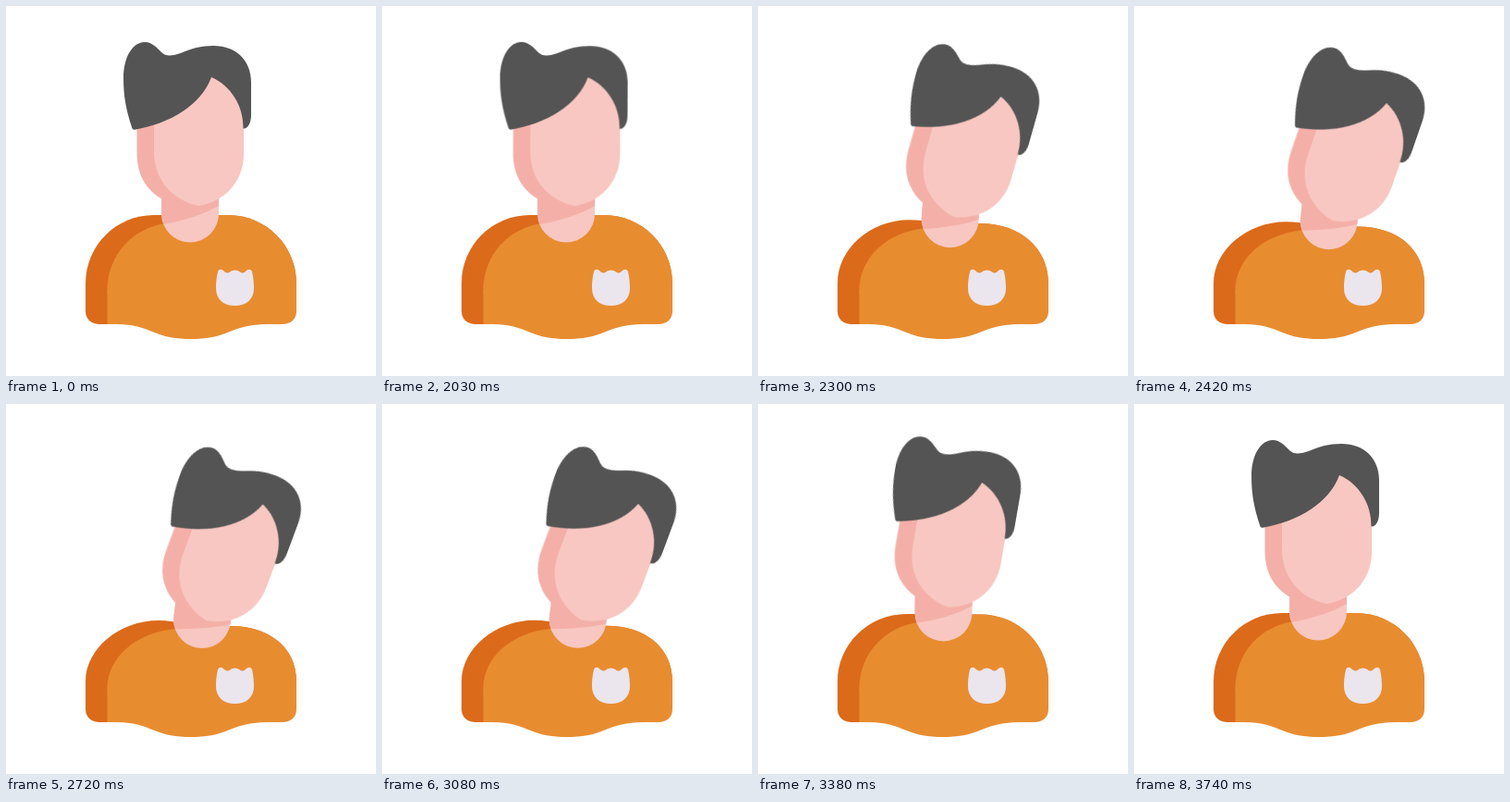
An HTML page that plays this animation: 400x400 px, repeating every 3.77 s.

```html
<!DOCTYPE html>
<html lang="en">
<head>
<meta charset="utf-8">
<title>Tilting head</title>
<style>
  html, body { margin: 0; width: 100%; height: 100%; overflow: hidden; background: #fff; }
  svg { display: block; width: 100vw; height: 100vh; }

  .skin { fill: #f8c7c1; }
  .shade { fill: #f4b0a8; }
  .shirt { fill: #e88c30; }
  .fold { fill: #dc6a1b; }
  .hair { fill: #545454; }
  .badge { fill: #ebe5ed; }

  .shift, .tilt, .morph { animation: 3770ms linear infinite; }
  .shift { animation-name: shift; }
  .tilt { animation-name: tilt; transform-origin: 190px 190px; }
  .morph { animation-name: sink; d: var(--rest); }

  .back {
    --rest: path("M86 302V300C86 259 119 226 160 226C170 226 180 226 195 226L240 226C281 226 314 259 314 300V302Z");
    --lean: path("M86 302V300C86 265 122 234 165 234C175 234 185 236 195 238L243 240C283 240 314 262 314 300V302Z");
  }
  .front {
    --rest: path("M109.5 312V308C109.5 268 138 240 172 235L195 226L240 226C281 226 314 259 314 300V312Z");
    --lean: path("M109.5 312V308C109.5 274 140 247 184 243L195 238L243 240C283 240 314 262 314 300V312Z");
  }
  .neck {
    --rest: path("M168 190L230 190L230 224.5A31 31 0 0 1 168 224.5Z");
    --lean: path("M185 200L246 200L243 233A31 31 0 0 1 181 233Z");
  }
  .shadow {
    --rest: path("M168 190L230 190L230 216L230 216Q205 230 170.2 236L168 224.5Z");
    --lean: path("M185 200L246 200L243 233L242.6 238Q222 243 182.8 243.5L181 233Z");
  }

  /* The head leans out, rests, then its position returns ahead of its rotation. */
  @keyframes shift {
    0%, 93.37%, 100% { transform: translate(0, 0); }
    53.05% { transform: translate(0, 0); animation-timing-function: cubic-bezier(.35, 0, .48, 1); }
    68.97% { transform: translate(18.1px, 13.1px); }
    80.37% { transform: translate(18.1px, 13.1px); animation-timing-function: cubic-bezier(.33, 0, .33, 1); }
  }
  @keyframes tilt {
    0%, 99.4%, 100% { transform: rotate(0deg); }
    53.05% { transform: rotate(0deg); animation-timing-function: cubic-bezier(.28, 0, .27, 1); }
    68.97% { transform: rotate(20.5deg); }
    82.1% { transform: rotate(20.5deg); animation-timing-function: cubic-bezier(.47, 0, .34, 1); }
  }
  /* Shoulders and neck sink with the lean. */
  @keyframes sink {
    0%, 94.43%, 100% { d: var(--rest); }
    53.05% { d: var(--rest); animation-timing-function: cubic-bezier(.35, 0, .4, 1); }
    68.97% { d: var(--lean); }
    80.64% { d: var(--lean); animation-timing-function: cubic-bezier(.33, 0, .33, 1); }
  }
</style>
</head>
<body>
<svg viewBox="0 0 400 400">
  <path class="fold morph back"/>
  <path class="fold" d="M86 300H140V344H101C93 344 86 339 86 330Z"/>
  <path class="shirt morph front"/>
  <path class="shirt" d="M109.5 308L120 300H314V330C314 339 307 344 299 344H282C264 344 252 348 242 352C228 358 216 360 200 360C184 360 172 358 158 352C148 348 138 344 120 344H109.5Z"/>
  <path class="badge" d="M227 305C227 297 228 292 229 287Q231 283 235 286Q237.500 289 240.500 288.500Q247.500 282.500 254.500 288.500Q257.500 289 260 286Q264 283 266 287C267 292 268 297 268 305C268 317 260 324 247.500 324C235 324 227 317 227 305Z"/>

  <path class="skin morph neck"/>
  <path class="shade morph shadow"/>

  <g class="shift">
    <g class="tilt">
      <path class="shade" d="M141.500 120V159C141.500 184 153 203 176 212L209 216L220 120Z"/>
      <path class="skin" d="M160 110V157C160 190 182 211 209 216C238 211 257 188 257 160V125C257 100 242 80 222 74Z"/>
      <path class="hair" d="M139 133.700Q137 134 136.300 132C129 110 127 95 127 78C127 55 137 39 150 39C158 39 163 45 168 50C173 55 180 54 190 50.500C200 46 211 43 224 43C250 43 265 60 265 82V118C265 127 261 133 256.500 132.500C257 108 243 86 222 77C211 107 178 127 139 133.700Z"/>
    </g>
  </g>
</svg>
</body>
</html>
```
